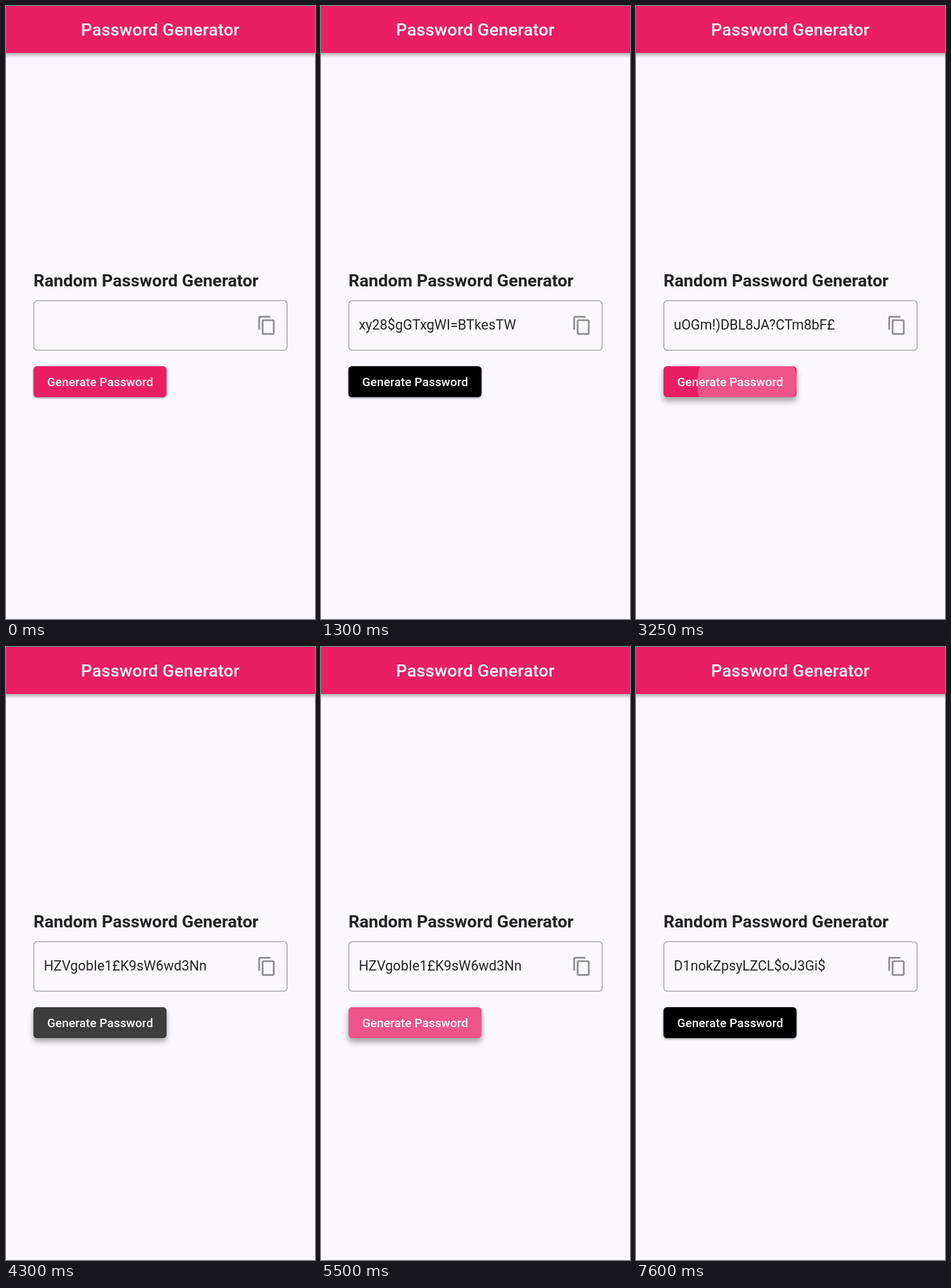
An HTML page that plays this animation: 480 by 953 pixels, repeating every 8000 ms.

```html
<!DOCTYPE html>
<html lang="en">
<head>
<meta charset="utf-8">
<title>Password Generator</title>
<style>
  html, body { margin: 0; width: 100%; height: 100%; overflow: hidden; background: #faf8fc; }
  svg { display: block; width: 100vw; height: 100vh; font-family: Roboto, sans-serif; }
  .bar { fill: #e91e63; }
  .bar-shadow { filter: blur(3px); opacity: .34; }
  .title { font-size: 26.67px; font-weight: 500; letter-spacing: .2px; fill: #fff; }
  .heading { font-size: 26.67px; font-weight: 700; fill: #222125; }
  .field { fill: none; stroke: #9d9ca0; stroke-width: 1.33; }
  .password { font-size: 21.33px; fill: #252428; }
  .label { font-size: 18.67px; font-weight: 500; letter-spacing: .1px; fill: #fff; }
  .icon { fill: #8c8b8f; }
</style>
</head>
<body>
<svg viewBox="0 0 480 953" preserveAspectRatio="none">
  <defs>
    <clipPath id="buttonClip"><rect x="42.67" y="560" width="206.67" height="48" rx="5.33"/></clipPath>
    <clipPath id="iconClip"><rect x="363" y="451" width="77" height="91"/></clipPath>
  </defs>

  <rect class="bar-shadow" x="-10" y="5" width="500" height="71"/>
  <rect class="bar" width="480" height="73"/>
  <text class="title" x="116.6" y="46">Password Generator</text>

  <text class="heading" x="42.67" y="436">Random Password Generator</text>
  <rect class="field" x="43.3" y="458.2" width="393.4" height="77" rx="5"/>
  <text class="password" id="password" x="58.67" y="503"></text>
  <g clip-path="url(#iconClip)"><circle id="iconInk" cx="404.7" cy="496.5" r="45"/></g>
  <path class="icon" transform="translate(389.3 480.5) scale(1.333)" fill-rule="evenodd"
    d="M16 1H4c-1.1 0-2 .9-2 2v14h2V3h12zM19 5H8c-1.1 0-2 .9-2 2v14c0 1.1.9 2 2 2h11c1.1 0 2-.9 2-2V7c0-1.1-.9-2-2-2zM19 21H8V7h11z"/>

  <rect id="shadow" x="42.67" y="560" width="206.67" height="48" rx="5.33"/>
  <g clip-path="url(#buttonClip)">
    <rect id="button" x="42" y="559" width="208" height="50"/>
    <circle id="ripple" fill="#fff"/>
  </g>
  <text class="label" x="64" y="590.5">Generate Password</text>
</svg>

<script>
const LOOP = 8000;
const TARGET = 106, CENTER = { x: 146, y: 584 };

const presses = [
  { down: 0,    up: 855,  x: 206, y: 588, password: 'xy28$gGTxgWI=BTkesTW' },
  { down: 1540, up: 2600, x: 206, y: 588, password: 'uOGm!)DBL8JA?CTm8bF£' },
  { down: 2925, up: 4250, x: 206, y: 589, password: 'HZVgobIe1£K9sW6wd3Nn' },
  { down: 4745, up: 6250, x: 212, y: 589.5, password: 'D1nokZpsyLZCL$oJ3Gi$' },
];

const $ = id => document.getElementById(id);
const password = $('password'), iconInk = $('iconInk'), shadow = $('shadow');
const button = $('button'), ripple = $('ripple');

const progress = (t, start, length) => Math.min(1, Math.max(0, (t - start) / length));
const mix = (a, b, k) => a + (b - a) * k;

function bezier(x1, y1, x2, y2) {
  const axis = (a, b, u) => 3 * a * u * (1 - u) ** 2 + 3 * b * u * u * (1 - u) + u ** 3;
  return x => {
    let lo = 0, hi = 1;
    for (let i = 0; i < 24; i++) {
      const mid = (lo + hi) / 2;
      if (axis(x1, x2, mid) < x) lo = mid; else hi = mid;
    }
    return axis(y1, y2, (lo + hi) / 2);
  };
}
const ease = bezier(.25, .1, .25, 1);
const fastOutSlowIn = bezier(.4, 0, .2, 1);

function drawButton(t) {
  const index = presses.findLastIndex(p => t >= p.down);
  const press = presses[index];
  const held = t < press.up;

  const shown = held ? presses[index - 1] : press;
  const text = shown ? shown.password : '';
  if (password.textContent !== text) password.textContent = text;
  button.setAttribute('fill', held ? '#e91e63' : '#000');

  const lift = fastOutSlowIn(progress(t, press.down, 200)) - fastOutSlowIn(progress(t, press.up, 200));
  shadow.style.transform = `translateY(${mix(1.6, 6.5, lift)}px)`;
  shadow.style.filter = `blur(${mix(1.6, 5, lift)}px)`;
  shadow.style.opacity = mix(.42, .34, lift);

  const grow = ease(progress(t, press.down, 1000));
  const fade = (1 - progress(t, press.up + 260, 150)) ** 2;
  ripple.setAttribute('cx', mix(press.x, CENTER.x, grow));
  ripple.setAttribute('cy', mix(press.y, CENTER.y, grow));
  ripple.setAttribute('r', mix(TARGET * .3, TARGET + 6.7, grow));
  ripple.setAttribute('opacity', .24 * progress(t, press.down, 75) * fade);
}

function drawIconInk(t) {
  iconInk.setAttribute('opacity', .1 * (progress(t, 7030, 200) - progress(t, 7400, 200)));
}

const start = performance.now();
function frame() {
  const t = (performance.now() - start) % LOOP;
  drawButton(t);
  drawIconInk(t);
  requestAnimationFrame(frame);
}
frame();
</script>
</body>
</html>
```
